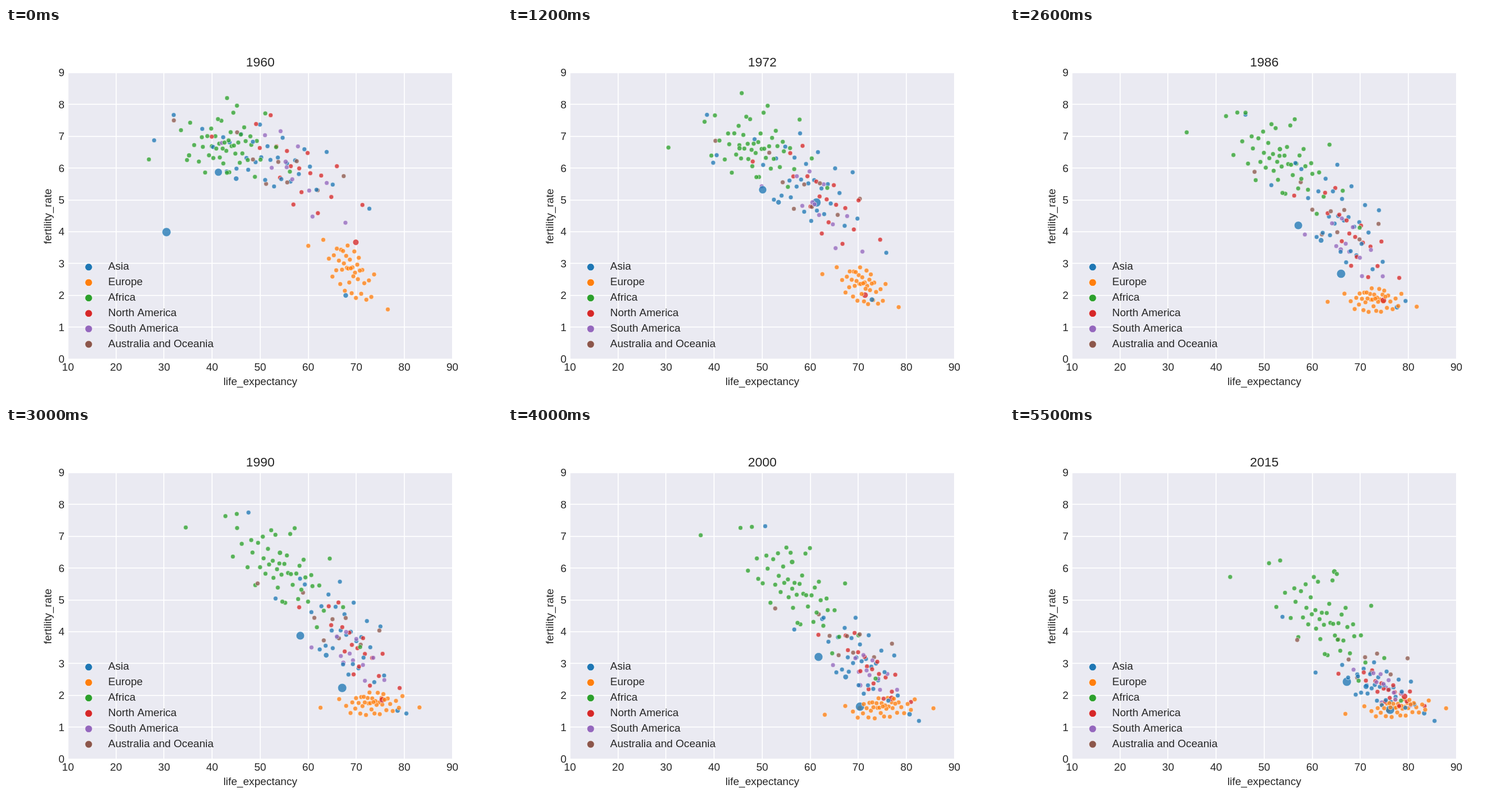
An HTML page with a canvas for the animation above (5.6 s loop, 864 px wide and 648 px high).

```html
<!DOCTYPE html>
<html lang="en">
<head>
<meta charset="utf-8">
<title>Fertility rate and life expectancy</title>
<style>
html, body { margin: 0; width: 100%; height: 100%; overflow: hidden; background: #fff; }
canvas { display: block; }
</style>
</head>
<body>
<canvas id="stage" width="864" height="648"></canvas>
<script>
const ctx = document.getElementById("stage").getContext("2d");
const FIRST_YEAR = 1960, YEARS = 56, YEAR_MS = 100;
const PLOT = { left: 108, top: 77.76, width: 669.6, height: 498.96 };
const FONT = '"Liberation Sans", Arial, sans-serif';
const COLORS = {
  "Asia": "#1f77b4", "Europe": "#ff7f0e", "Africa": "#2ca02c",
  "North America": "#d62728", "South America": "#9467bd", "Australia and Oceania": "#8c564b"
};
const dots = [];

const toX = life => PLOT.left + PLOT.width * (life - 10) / 80;
const toY = rate => PLOT.top + PLOT.height * (1 - rate / 9);

// Rows are [year, ...values]; returns the values at a year between them.
function interpolate(year, rows) {
  let i = 1;
  while (i < rows.length - 1 && year > rows[i][0]) i++;
  const [a, b] = [rows[i - 1], rows[i]];
  const part = (year - a[0]) / (b[0] - a[0]);
  return a.slice(1).map((value, k) => value + (b[k + 1] - value) * part);
}

function seededRandom(seed) {
  return () => {
    seed = (seed * 16807) % 2147483647;
    return seed / 2147483647;
  };
}

// Bell-shaped deviation for a rank between 0 and 1.
const deviation = rank => 0.55 * Math.log(rank / (1 - rank));

// Rows: [year, mean life, life spread, mean rate, rate change per life spread, rate spread].
function addRegion(region, count, seed, ...rows) {
  const random = seededRandom(seed);
  for (let i = 0; i < count; i++) {
    const lifeDev = deviation((i + 0.15 + 0.7 * random()) / count);
    const rateDev = deviation(0.02 + 0.96 * ((i * 0.618 + 0.25 * random()) % 1));
    dots.push({ region, order: random(), radius: () => 4, place(year) {
      const [life, lifeSpread, rate, slope, rateSpread] = interpolate(year, rows);
      return [life + lifeSpread * lifeDev,
        Math.max(1.2, rate + slope * lifeDev + rateSpread * rateDev)];
    } });
  }
}

// Rows: [year, life, rate].
function addCountry(region, size, endSize, ...rows) {
  dots.push({
    region, order: 0.5,
    radius: year => size + (endSize - size) * (year - FIRST_YEAR) / (YEARS - 1),
    place: year => interpolate(year, rows)
  });
}

addRegion("Asia", 30, 4211,
  [1960, 52, 8.5, 6.3, -.35, .65], [1980, 64.5, 5.5, 5.1, -.6, 1.1],
  [1995, 69.5, 5, 3.4, -.6, .9], [2015, 74, 4.7, 2.3, -.25, .45]);
addRegion("Europe", 39, 9173,
  [1960, 68.7, 3, 2.75, -.45, .55], [1980, 72.3, 2.8, 2, -.12, .3],
  [1995, 73.9, 4.2, 1.6, 0, .24], [2015, 77.9, 3.8, 1.6, 0, .2]);
addRegion("Africa", 48, 3307,
  [1960, 43, 5.2, 6.65, 0, .65], [1980, 52.5, 6.3, 6.55, -.25, .75],
  [1995, 55.5, 6.5, 5.6, -.75, .8], [2015, 62.5, 6.3, 4.35, -.6, .85]);
addRegion("North America", 18, 6421,
  [1960, 57.5, 7, 5.9, -.7, .75], [1980, 66.5, 5.2, 4.3, -.8, .7],
  [1995, 71.5, 4.4, 3, -.7, .5], [2015, 75.5, 4, 2.15, -.3, .25]);
addRegion("South America", 11, 2749,
  [1960, 57, 6.5, 5.9, -.7, .8], [1980, 65.5, 4.5, 4, -.5, .7],
  [1995, 71.5, 3.5, 2.9, -.2, .4], [2015, 75.5, 3, 2.3, -.3, .2]);
addRegion("Australia and Oceania", 9, 8117,
  [1960, 53, 10, 6.1, -.9, .6], [1980, 61.5, 7.5, 4.9, -1, .7],
  [1995, 66, 7, 4, -.7, .5], [2015, 70.5, 6.5, 3.1, -.5, .5]);

// China, India, Indonesia, Japan
addCountry("Asia", 7.7, 7.7, [1960, 30.5, 3.99], [1963, 53, 7.3], [1972, 61.3, 4.92],
  [1980, 63.9, 2.32], [1986, 66, 2.68], [1995, 68.4, 1.68], [2015, 76.2, 1.55]);
addCountry("Asia", 6.7, 7.7, [1960, 41.3, 5.87], [1972, 50.1, 5.32],
  [1986, 57.1, 4.2], [1995, 59.9, 3.47], [2015, 67.2, 2.43]);
addCountry("Asia", 4.5, 4.8, [1960, 45, 5.67], [1980, 59, 4.43],
  [1995, 66.1, 2.68], [2015, 71.2, 2.28]);
addCountry("Asia", 4.5, 4.3, [1960, 67.8, 2], [1980, 76.2, 1.78],
  [1995, 79.8, 1.4], [2015, 83.3, 1.44]);
// Afghanistan, Cambodia
addCountry("Asia", 4, 4, [1960, 32, 7.67], [1986, 46.1, 7.68],
  [1995, 49.4, 7.83], [2006, 52.1, 6.7], [2015, 53.8, 4.47]);
addCountry("Asia", 4, 4, [1960, 42.3, 6.97], [1972, 39.8, 6.17], [1977, 19, 5],
  [1980, 28.2, 5.69], [1986, 56.5, 6.16], [2015, 69.5, 2.6]);
// Rwanda, Nigeria
addCountry("Africa", 4, 4, [1960, 43.1, 8.2], [1980, 47.5, 8.46], [1993, 44.5, 6.9],
  [1994, 13.5, 6.5], [1995, 43.8, 6.3], [2015, 65.3, 3.75]);
addCountry("Africa", 4.1, 4.6, [1960, 35.2, 6.4], [1980, 52, 6.77],
  [2006, 57.5, 6.02], [2015, 64.6, 5.89]);
// Brazil, United States
addCountry("South America", 4.2, 4.6, [1960, 55.3, 6.2], [1980, 63.9, 4.07],
  [1995, 69, 2.5], [2015, 74.5, 1.77]);
addCountry("North America", 5.3, 5.3, [1960, 69.9, 3.67], [1972, 71.4, 2.01],
  [1980, 73.9, 1.82], [2015, 79.2, 1.97]);

dots.sort((a, b) => a.order - b.order);

function text(string, x, y, align = "center", size = 18.67) {
  ctx.font = `${size}px ${FONT}`;
  ctx.textAlign = align;
  ctx.fillStyle = "#262626";
  ctx.fillText(string, x, y);
}

function circle(x, y, radius, color) {
  ctx.beginPath();
  ctx.arc(x, y, radius, 0, 2 * Math.PI);
  ctx.fillStyle = color;
  ctx.fill();
  ctx.stroke();
}

function drawAxes(year) {
  const { left, top, width, height } = PLOT;
  ctx.fillStyle = "#fff";
  ctx.fillRect(0, 0, 864, 648);
  ctx.fillStyle = "#eaeaf2";
  ctx.fillRect(left, top, width, height);
  for (let life = 10; life <= 90; life += 10) {
    ctx.fillStyle = "#fff";
    ctx.fillRect(Math.round(toX(life)) - 1, top, 1.7, height);
    text(life, toX(life), 597);
  }
  for (let rate = 0; rate <= 9; rate++) {
    ctx.fillStyle = "#fff";
    ctx.fillRect(left, Math.round(toY(rate)) - 1, width, 1.7);
    text(rate, 102, toY(rate) + 6.5, "right");
  }
  text(year, 443, 67, "center", 22.4);
  text("life_expectancy", 443, 621.5);
  ctx.save();
  ctx.translate(79, 328);
  ctx.rotate(-Math.PI / 2);
  text("fertility_rate", 0, 0);
  ctx.restore();
}

function drawDots(year) {
  ctx.save();
  ctx.beginPath();
  ctx.rect(PLOT.left, PLOT.top, PLOT.width, PLOT.height);
  ctx.clip();
  ctx.globalAlpha = 0.77;
  for (const dot of dots) {
    const [life, rate] = dot.place(year);
    circle(toX(life), toY(rate), dot.radius(year), COLORS[dot.region]);
  }
  ctx.restore();
}

function drawLegend() {
  Object.entries(COLORS).forEach(([region, color], i) => {
    circle(144, 416.5 + 26.9 * i, 6.4, color);
    text(region, 178, 421.3 + 26.9 * i, "left");
  });
}

function frame() {
  const year = FIRST_YEAR + Math.floor(performance.now() / YEAR_MS) % YEARS;
  ctx.strokeStyle = "#fff";
  ctx.lineWidth = 0.8;
  drawAxes(year);
  drawDots(year);
  drawLegend();
  requestAnimationFrame(frame);
}
frame();
</script>
</body>
</html>
```
